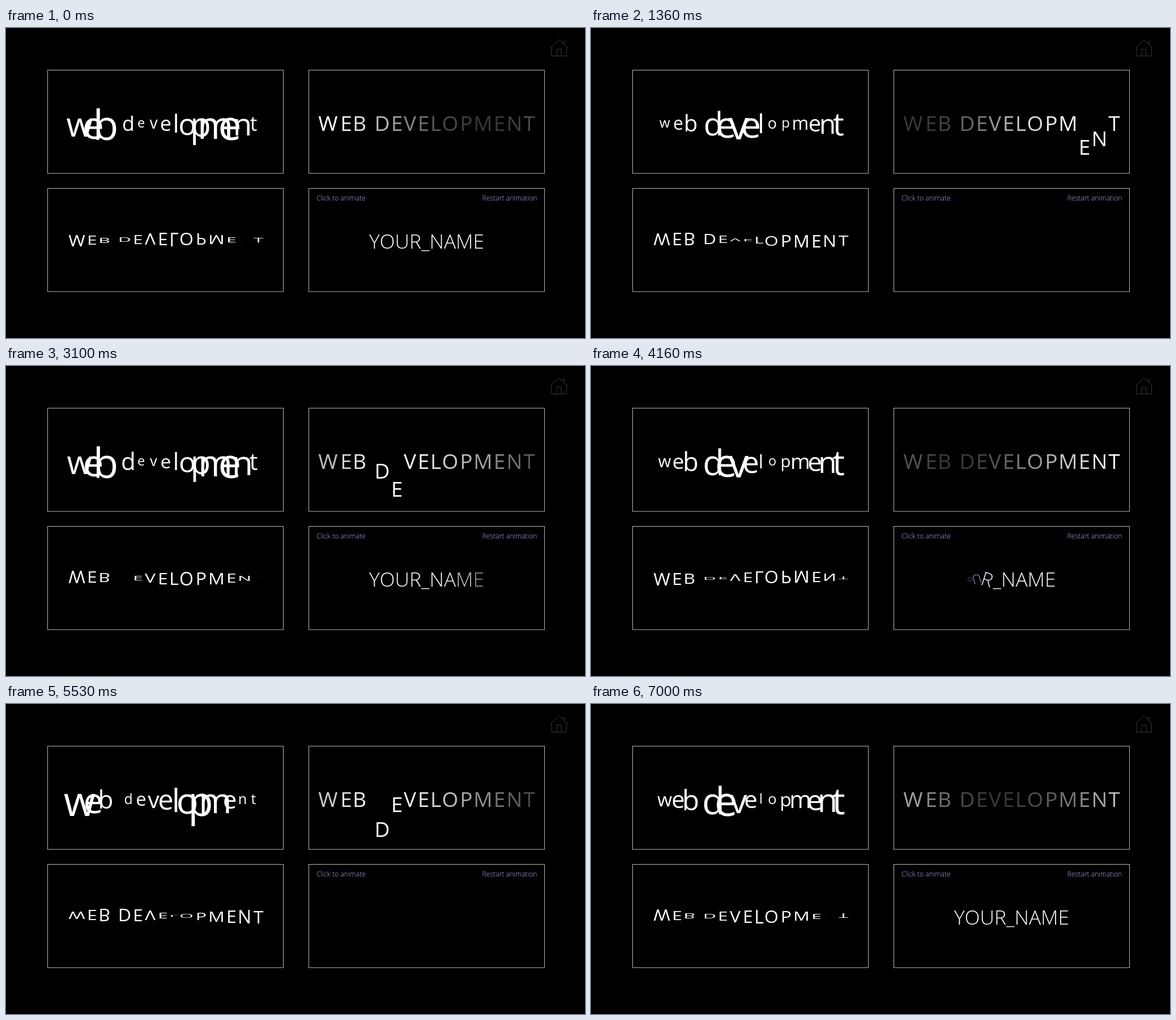
These frames come from a looping animation (1022 by 548 pixels, 7.04 s). An HTML page with a canvas:

```html
<!DOCTYPE html>
<html lang="en">
<head>
<meta charset="utf-8">
<title>Text animations</title>
<style>
  html, body { margin: 0; width: 100%; height: 100%; overflow: hidden; background: #000; }
  canvas { display: block; }
</style>
</head>
<body>
<canvas id="stage" width="1022" height="548"></canvas>
<script>
const ctx = document.getElementById('stage').getContext('2d');
const LOOP = 7040;
const FAMILY = '"Open Sans", "Noto Sans", sans-serif';
const TITLE = 'web development';

// Letter centres of the title in each panel (the space is unused).
const SCALE_X = [130, 154, 176, 0, 216, 238.5, 260.5, 282, 300, 320, 343.5, 369.5, 395, 417.5, 437];
const BOUNCE_X = [568.5, 600.5, 624, 0, 664, 690, 713, 737, 758.5, 784, 812.5, 842, 871, 897.5, 923.5];
const FLIP_X = [125, 152, 173.5, 0, 209.5, 233, 254.5, 277, 296.5, 318.5, 344.5, 371.5, 398, 421, 445.5];

const mod = (a, n) => ((a % n) + n) % n;
const clamp = x => Math.min(1, Math.max(0, x));
const smooth = x => { x = clamp(x); return x * x * (3 - 2 * x); };
const mix = (a, b, p) => a + (b - a) * p;

function setFont(size, weight = 400) {
  ctx.font = `${weight} ${size}px ${FAMILY}`;
}

function eachLetter(text, draw) {
  [...text].forEach((letter, i) => { if (letter !== ' ') draw(letter, i); });
}

function drawFrame() {
  ctx.strokeStyle = '#b8b8b4';
  ctx.lineWidth = 1;
  for (const x of [73.5, 534.5])
    for (const y of [74.5, 283.5]) ctx.strokeRect(x, y, 416, 182.5);

  ctx.strokeStyle = '#363636';
  ctx.stroke(new Path2D(
    'M961 35.5L976 20.8L991.5 35.5M963 33.5V49.5H989.5V33.5M972 49V37.5H980V49M982.5 26.5V24H986V30'));

  ctx.fillStyle = '#b4a6ec';
  setFont(12.2, 300);
  ctx.textAlign = 'left';
  ctx.fillText('Click to animate', 548, 304.5);
  ctx.textAlign = 'right';
  ctx.fillText('Restart animation', 937.5, 304.5);
  ctx.textAlign = 'center';
  ctx.fillStyle = '#fff';
}

// Apparent font size over one 3 s cycle, measured in steps of 300 ms.
function waveSize(step) {
  const points = [[2, 78], [4.65, 25], [5.4, 25], [11.5, 77], [12, 78]];
  const u = 2 + mod(step - 2, 10);
  const k = points.findIndex(p => p[0] > u);
  const [u0, s0] = points[k - 1], [u1, s1] = points[k];
  return mix(s0, s1, (u - u0) / (u1 - u0));
}

function drawScaling(t) {
  eachLetter(TITLE, (letter, i) => {
    const size = waveSize(i - t / 300);
    setFont(size * 0.94);
    ctx.fillText(letter, SCALE_X[i], 166 + size * 0.41);
  });
}

function drawBouncing(t) {
  setFont(37);
  eachLetter(TITLE.toUpperCase(), (letter, i) => {
    const age = mod(t + 2 - 100 * i, 2500);
    const drop = age < 250 ? 53 * Math.sin(Math.PI * age / 250) ** 2 : 0;
    ctx.globalAlpha = drop ? 1 : 0.61 + 0.39 * Math.cos(2 * Math.PI * (age - 115) / 2500);
    ctx.fillText(letter, BOUNCE_X[i], 182.4 + drop);
  });
  ctx.globalAlpha = 1;
}

function drawFlipping(t) {
  setFont(32);
  eachLetter(TITLE.toUpperCase(), (letter, i) => {
    const angle = Math.PI * (3 + t / 100 - i) / 10;
    ctx.save();
    ctx.translate(FLIP_X[i], 374.7);
    ctx.scale(1, Math.sin(angle + 0.1 * Math.sin(2 * angle)));
    ctx.fillText(letter, 0, 13.2);
    ctx.restore();
  });
}

// Each letter either grows in or spins out, 50 ms after its neighbour.
const PHASES = [[-9999, 'in'], [420, 'out'], [2480, 'in'], [4005, 'out'], [5840, 'in']];

function nameLetter(age, kind) {
  if (kind === 'in') return {
    size: age > 0 ? clamp((age + 20) / 125) : 0,
    alpha: smooth((age - 30) / 350), spin: 0, tint: 0
  };
  const p = clamp(age / 155);
  return { size: 1 - p, alpha: 1 - 0.5 * p * p, spin: p * 450 * Math.PI / 180, tint: clamp(p * 6) };
}

function drawName(t) {
  const [start, kind] = PHASES.filter(p => p[0] <= t).pop();
  setFont(35.3, 300);
  const letters = [...'YOUR_NAME'].map((letter, i) => {
    const state = nameLetter(t - start - 50 * i, kind);
    return { letter, ...state, width: ctx.measureText(letter).width * state.size };
  });
  let x = 742.5 - letters.reduce((sum, l) => sum + l.width, 0) / 2;
  for (const l of letters) {
    if (l.size > 0) {
      ctx.save();
      ctx.translate(x + l.width / 2, 377);
      ctx.rotate(l.spin);
      ctx.scale(l.size, l.size);
      ctx.globalAlpha = l.alpha;
      ctx.fillStyle = `rgb(${mix(255, 172, l.tint)},${mix(255, 160, l.tint)},${mix(255, 225, l.tint)})`;
      ctx.fillText(l.letter, 0, 13.2);
      ctx.restore();
    }
    x += l.width;
  }
}

function render(now) {
  const t = now % LOOP;
  ctx.fillStyle = '#000';
  ctx.fillRect(0, 0, 1022, 548);
  drawFrame();
  drawScaling(t);
  drawBouncing(t);
  drawFlipping(t);
  drawName(t);
  requestAnimationFrame(render);
}
requestAnimationFrame(render);
</script>
</body>
</html>
```
